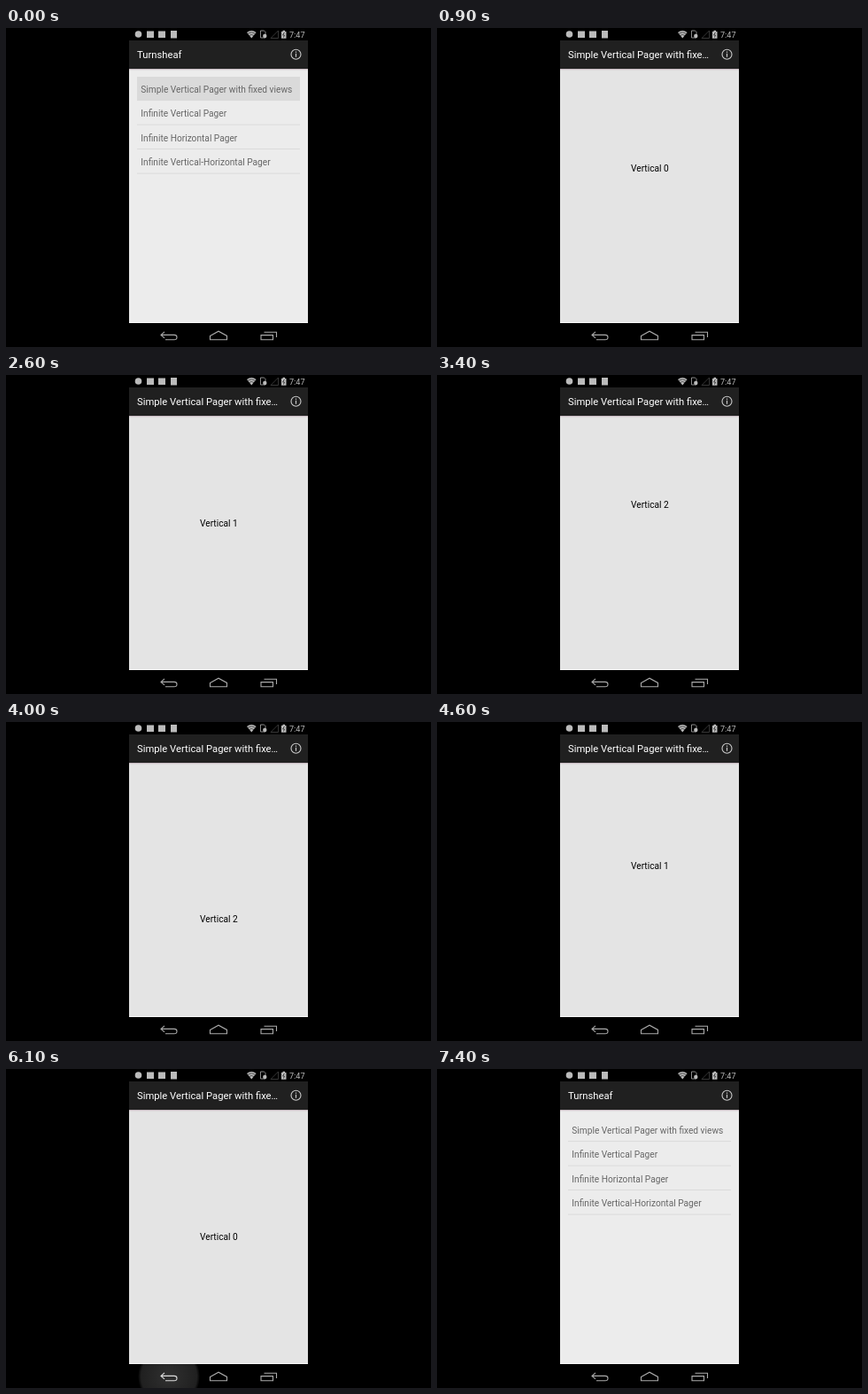
These frames come from a looping animation (480x360 px, 7.5 s). An HTML page:

```html
<!DOCTYPE html>
<html lang="en">
<head>
<meta charset="utf-8">
<style>
  html, body { margin: 0; width: 100%; height: 100%; overflow: hidden; background: #000; }
  svg { display: block; width: 480px; height: 360px; }
  text { font: 10.18px Roboto, sans-serif; }
  .title { font-size: 11.25px; fill: #fff; }
  .line { fill: none; stroke: #aaa; stroke-width: 1.1; }
  #rows text { fill: #666; }
  #rows path { stroke: #dadada; }
</style>
</head>
<body>
<svg viewBox="0 0 480 360">
  <defs>
    <clipPath id="content"><rect x="139" y="46" width="202" height="287"/></clipPath>
    <clipPath id="navbar"><rect x="139" y="333" width="202" height="27"/></clipPath>
    <radialGradient id="halo">
      <stop offset="0" stop-color="#303030"/>
      <stop offset=".9" stop-color="#202020"/>
      <stop offset="1" stop-color="#202020" stop-opacity="0"/>
    </radialGradient>
    <linearGradient id="shade" x2="0" y2="1">
      <stop stop-color="#b5a3ad"/>
      <stop offset="1" stop-color="#d8ccd2" stop-opacity="0"/>
    </linearGradient>
  </defs>

  <!-- List screen -->
  <rect x="139" y="14" width="202" height="319" fill="#ececec"/>
  <rect x="139" y="14" width="202" height="32" fill="#202020"/>
  <text class="title" x="148" y="34">Turnsheaf</text>
  <rect id="pressed" x="148" y="55" width="184" height="27" fill="#dadada"/>
  <g id="rows"></g>

  <!-- Pager screen -->
  <g id="pager">
    <rect x="139" y="14" width="202" height="319" fill="#e4e4e4"/>
    <rect x="139" y="14" width="202" height="32" fill="#202020"/>
    <text class="title" x="148" y="34">Simple Vertical Pager with fixe…</text>
    <g clip-path="url(#content)"><g id="pages"></g></g>
  </g>
  <rect x="139" y="46" width="202" height="2" fill="url(#shade)"/>
  <rect x="139" y="332" width="202" height="1" fill="#f8f8f8"/>

  <!-- Info button -->
  <circle class="line" cx="327.5" cy="29.8" r="5.5" style="stroke:#ccc"/>
  <path d="M327.5 26.5v1.3M327.5 28.8v4" stroke="#ccc" stroke-width="1.2"/>

  <!-- Status bar -->
  <g fill="#bbb">
    <circle cx="149.5" cy="7" r="3.8"/>
    <rect x="159" y="3.5" width="8" height="7.5"/>
    <rect x="172" y="3.5" width="8" height="7.5"/>
    <rect x="186" y="3" width="7" height="8.5"/>
    <path d="M277.3 11.5L272 5Q277.3 1 282.6 5Z"/>
    <path d="M273 6.3Q277.3 3.4 281.6 6.3M274.5 8.5Q277.3 6.5 280 8.5" fill="none" stroke="#222" stroke-width=".7"/>
    <path d="M287.5 3h4l1.5 1.5V11h-5.5z" fill="none" stroke="#999" stroke-width=".9"/>
    <circle cx="292.3" cy="9" r="2.2"/>
    <path d="M299 11.5h8.5V3z" fill="none" stroke="#444" stroke-width=".8"/>
    <path d="M311 4h1.5V2.7h2.5V4h1.5v7.7H311z"/>
    <path d="M314.5 5l-2 3h2l-1 2.5" fill="none" stroke="#333" stroke-width=".9"/>
    <text x="320" y="10.6" style="font-size:9.1px">7:47</text>
  </g>

  <!-- Navigation bar -->
  <circle id="glow" cx="184" cy="347" fill="url(#halo)" clip-path="url(#navbar)"/>
  <g class="line" transform="translate(0 .4)">
    <path id="back" d="M179 342.5L175 346L179 349.5M175.5 346H190Q193 346 193 348.7T190 351.4H180"/>
    <path d="M230.5 347L240 341.8L249.5 347V351.3H230.5Z"/>
    <path d="M288 346.2H301.5V351.3H288ZM291.5 342.8H305.5V348.5"/>
  </g>
</svg>

<script>
const LOOP = 7500, STEP = 100, PAGE = 288, CENTER = 189, ROW = 27.5;
const $ = id => document.getElementById(id);

$('rows').innerHTML = ['Simple Vertical Pager with fixed views', 'Infinite Vertical Pager',
  'Infinite Horizontal Pager', 'Infinite Vertical-Horizontal Pager']
  .map((label, i) => `<text x="152.3" y="${72.6 + i * ROW}">${label}</text>
    <path d="M148 ${81.6 + i * ROW}h184"/>`).join('');

$('pages').innerHTML = [0, 1, 2]
  .map(n => `<text x="219" y="${CENTER + 3.7 + n * PAGE}">Vertical ${n}</text>`).join('');

// Eased progress from 0 to 1
function ramp(t, start, duration) {
  const u = Math.min(1, Math.max(0, (t - start) / duration));
  return u * u * (3 - 2 * u);
}

// Finger movements; the distances add up to a round trip
const swipes = [
  { start: 800, duration: 100, distance: 31 },
  { start: 1900, duration: 700, distance: 279 },
  { start: 2800, duration: 300, distance: 263 },
  { start: 3100, duration: 500, distance: 70 },
  { start: 3600, duration: 400, distance: -100 },
  { start: 4100, duration: 500, distance: -228 },
  { start: 4600, duration: 300, distance: -43 },
  { start: 4900, duration: 400, distance: -237 },
  { start: 5300, duration: 400, distance: -35 },
];

const scrollAt = t => swipes.reduce(
  (sum, { start, duration, distance }) => sum + distance * ramp(t, start, duration), 0);

function draw(now) {
  const t = Math.floor(now % LOOP / STEP) * STEP;
  const glow = ramp(t, 5700, 400) - ramp(t, 6900, 400);
  $('pressed').setAttribute('opacity', t < 800 ? 1 : 0);
  $('pager').setAttribute('opacity', ramp(t, 600, 200) - ramp(t, 6800, 200));
  $('pages').setAttribute('transform', `translate(0 ${-scrollAt(t)})`);
  $('glow').setAttribute('opacity', glow);
  $('glow').setAttribute('r', 20 + 15 * glow);
  $('back').style.stroke = glow > .5 ? '#ddd' : '#aaa';
}

const start = performance.now();
function frame() {
  draw(performance.now() - start);
  requestAnimationFrame(frame);
}
frame();
</script>
</body>
</html>
```
